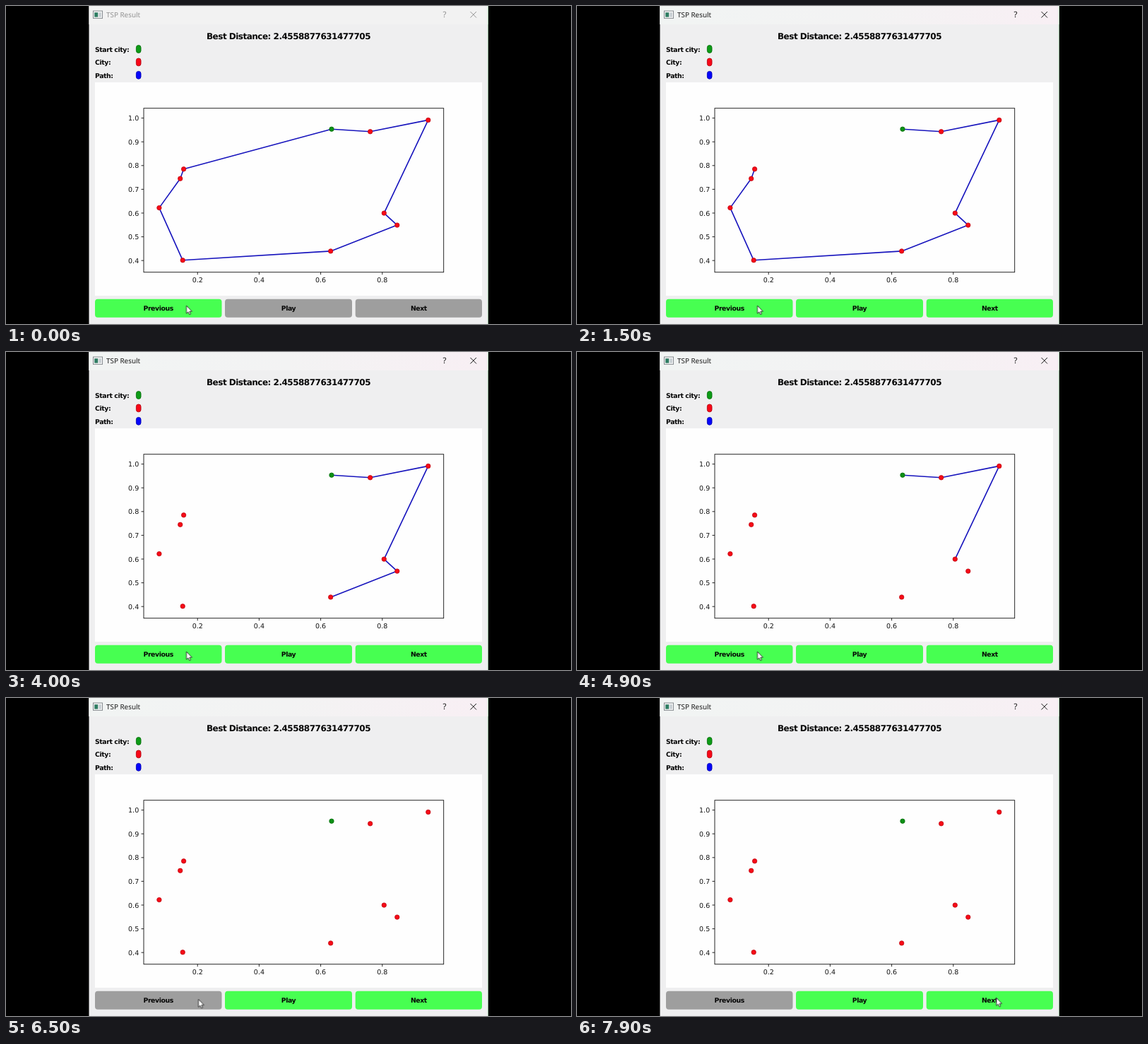
An HTML page that plays this animation: 800x450 px, repeating every 8 s.

```html
<!DOCTYPE html>
<html lang="en">
<head>
<meta charset="utf-8">
<title>TSP Result</title>
<style>
  html, body { margin: 0; width: 100%; height: 100%; overflow: hidden; background: #000; }
  svg { display: block; width: 800px; height: 450px; }
  text { text-rendering: geometricPrecision; }
  .bold { font: bold 9.3px "DejaVu Sans", sans-serif; letter-spacing: -.042em; fill: #050505; }
  .heading { font-size: 12px; }
  .mid { text-anchor: middle; }
  .end { text-anchor: end; }
  .tick { font: 9.5px "DejaVu Sans", sans-serif; fill: #111; }
  .caption { font: 9.9px "Noto Sans", "Open Sans", sans-serif; }
  .axis { fill: none; stroke: #111; stroke-width: .9; }
  .edge { stroke: #1714bd; stroke-width: 1.6; stroke-linecap: round; }

  .bar, .caption, .glyph, .prev, .play, .edge, .pointer { animation: 8s step-end infinite; }
  .bar { animation-name: bar; }
  .caption { animation-name: caption; }
  .glyph { fill: none; stroke-width: 1; animation-name: glyph; }
  .prev { animation-name: prev; }
  .play { animation-name: play; }
  .pointer { animation-name: pointer; }

  @keyframes bar { 0% { opacity: 0; } 1.25%, 100% { opacity: 1; } }
  @keyframes caption { 0% { fill: #929292; } 1.25%, 100% { fill: #191919; } }
  @keyframes glyph { 0% { stroke: #929292; } 1.25%, 100% { stroke: #191919; } }
  @keyframes play { 0% { fill: #9e9e9e; } 18.75%, 100% { fill: #47ff51; } }
  @keyframes prev { 0% { fill: #47ff51; } 81.25%, 100% { fill: #9e9e9e; } }
  @keyframes pointer {
    0% { transform: translate(255.5px, 424px); }
    81.25% { transform: translate(272.5px, 426.3px); }
    83.75% { transform: translate(272.5px, 426.3px); animation-timing-function: ease-in-out; }
    95%, 100% { transform: translate(593.8px, 424.3px); }
  }
</style>
</head>
<body>
<svg viewBox="0 0 800 450">
  <defs>
    <linearGradient id="tint">
      <stop offset="0" stop-color="#f1f4f3"/>
      <stop offset=".5" stop-color="#f3f3f3"/>
      <stop offset="1" stop-color="#f8eff4"/>
    </linearGradient>
  </defs>
  <rect width="800" height="450"/>
  <rect x="117.5" width="565" height="450" fill="#efeff0"/>
  <rect x="117.5" width="565" height="26" fill="#f2f2f2"/>
  <rect class="bar" x="117.5" width="565" height="26" fill="url(#tint)"/>
  <path d="M682.3 0V450" stroke="#b5e6bd" stroke-width=".8"/>

  <rect x="123.5" y="7" width="13" height="10.4" fill="#f7f7f7" stroke="#858b90"/>
  <rect x="125.2" y="9.2" width="5" height="6.4" fill="#2f7d63"/>
  <rect x="131.2" y="9.2" width="3.8" height="6.4" fill="#c9d0d4"/>
  <text class="caption" x="142" y="16">TSP Result</text>
  <text class="caption mid" x="621" y="16" style="font-size:11.5px">?</text>
  <path class="glyph" d="M657.5 8l8.5 8.5m0-8.5l-8.5 8.5"/>

  <text class="bold heading mid" x="400" y="47">Best Distance: 2.4558877631477705</text>
  <g id="legend"></g>

  <rect x="126" y="108" width="548" height="302" fill="#fefefe"/>
  <g id="plot"></g>

  <rect class="prev" x="126" y="414.7" width="179.5" height="26" rx="4"/>
  <rect class="play" x="310" y="414.7" width="180" height="26" rx="4"/>
  <rect class="play" x="494.7" y="414.7" width="179.3" height="26" rx="4"/>
  <text class="bold mid" x="215.7" y="431.4">Previous</text>
  <text class="bold mid" x="400" y="431.4">Play</text>
  <text class="bold mid" x="584.4" y="431.4">Next</text>

  <path class="pointer" d="M0 0V11.2L2.5 8.9L4.2 12.6L6 11.8L4.4 8.2H7.8Z"
        fill="#fff" stroke="#222" stroke-width=".9" stroke-linejoin="round"/>
</svg>
<script>
  const LOOP = 8000;
  const cities = [[461, 174.2], [251.6, 230.8], [246.7, 244.3], [216.9, 285.6], [250.2, 359.8],
    [459.7, 346.9], [553.8, 310.1], [535.3, 293.1], [597.8, 161.4], [515.7, 177.8]];
  // When each edge of the tour disappears, in ms.
  const removals = [1500, 2100, 2700, 3300, 3900, 4300, 4800, 5300, 5900, 6500];

  const add = (parent, tag, attrs, text = '') => {
    const el = document.createElementNS('http://www.w3.org/2000/svg', tag);
    for (const key in attrs) el.setAttribute(key, attrs[key]);
    el.textContent = text;
    return parent.appendChild(el);
  };

  const legend = document.getElementById('legend');
  [['Start city:', '#0d9b16', '#08700e'], ['City:', '#f80718', '#b4040f'], ['Path:', '#0505fa', '#0000b4']]
    .forEach(([label, fill, stroke], i) => {
      const y = 61 + i * 18.4;
      add(legend, 'text', { class: 'bold', x: 126, y: y + 3.8 }, label);
      add(legend, 'rect', { x: 184.4, y: y - 5.4, width: 6.6, height: 10.8, rx: 3.2, fill, stroke, 'stroke-width': .9 });
    });

  const plot = document.getElementById('plot');
  const toX = v => 184 + 436 * v;
  const toY = v => 494.6 - 336 * v;
  add(plot, 'rect', { class: 'axis', x: 195, y: 144.7, width: 424.7, height: 232 });
  for (let i = 1; i <= 4; i++) {
    const v = i / 5, x = toX(v);
    add(plot, 'path', { class: 'axis', d: `M${x} 376.7v3.5` });
    add(plot, 'text', { class: 'tick mid', x, y: 390.8 }, v.toFixed(1));
  }
  for (let i = 4; i <= 10; i++) {
    const v = i / 10, y = toY(v);
    add(plot, 'path', { class: 'axis', d: `M195 ${y}h-3.5` });
    add(plot, 'text', { class: 'tick end', x: 188.2, y: y + 3.5 }, v.toFixed(1));
  }

  let rules = '';
  removals.forEach((time, i) => {
    const [x1, y1] = cities[i], [x2, y2] = cities[(i + 1) % cities.length];
    add(plot, 'line', { class: 'edge', x1, y1, x2, y2, style: `animation-name: edge${i}` });
    rules += `@keyframes edge${i} { 0% { opacity: 1 } ${time / LOOP * 100}%, 100% { opacity: 0 } }\n`;
  });
  add(document.head, 'style', {}).remove();
  const sheet = document.createElement('style');
  sheet.textContent = rules;
  document.head.append(sheet);

  cities.forEach(([cx, cy], i) => add(plot, 'circle', {
    cx, cy, r: 3.2, 'stroke-width': .8,
    fill: i ? '#f60a17' : '#0d9015', stroke: i ? '#bd0710' : '#08700e'
  }));
</script>
</body>
</html>
```
